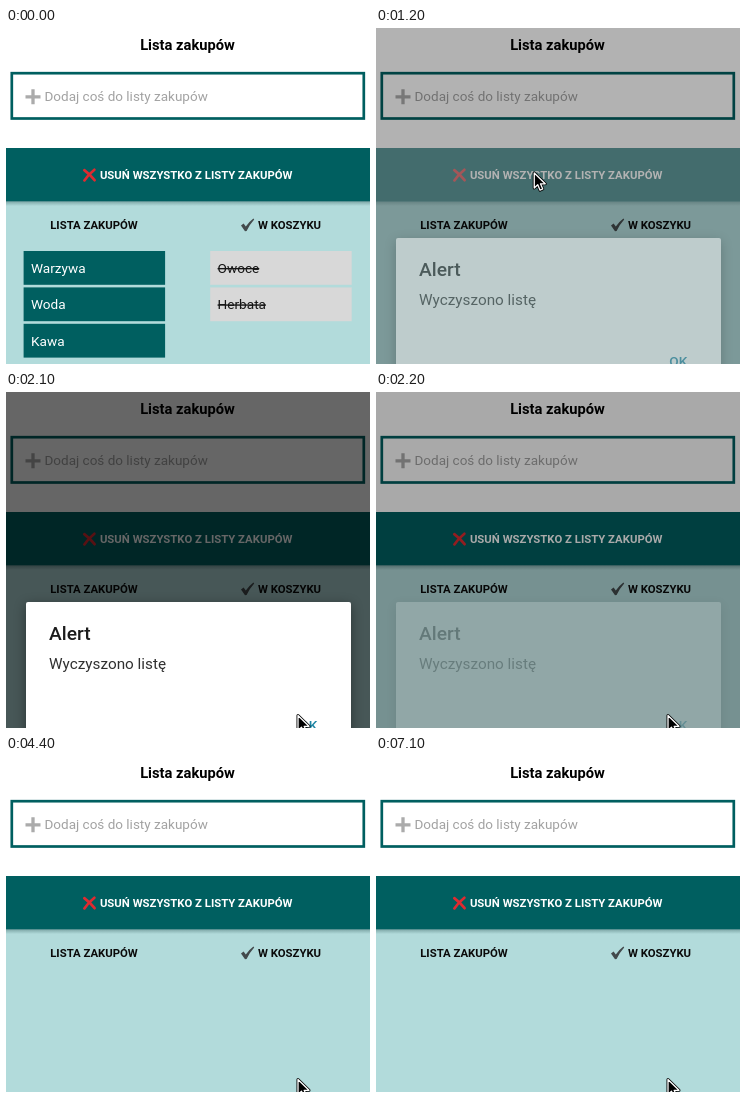
Recreate the animation shown at these times as an HTML page. Size 364x336 px, loop 7200 ms.

```html
<!DOCTYPE html>
<html lang="pl">
<head>
<meta charset="utf-8">
<title>Lista zakupów</title>
<style>
html, body { margin: 0; width: 100%; height: 100%; overflow: hidden; background: #fff; }
svg { display: block; width: 364px; height: 336px; }
text { font-family: Roboto, "Noto Sans", sans-serif; font-size: 13.6px; }
.title { font-size: 14.7px; font-weight: 700; text-anchor: middle; }
.hint { font-size: 13.5px; }
.caps { font-size: 11.35px; font-weight: 700; text-anchor: middle; }
.done { text-decoration: line-through; }
.head { font-size: 19.2px; font-weight: 500; }
.body { font-size: 15.3px; }
.ok { font-size: 13.6px; font-weight: 500; }
.card { filter: drop-shadow(0 3px 6px rgba(0, 0, 0, .4)); }
</style>
</head>
<body>
<svg viewBox="0 0 364 336" xmlns="http://www.w3.org/2000/svg">
  <defs>
    <linearGradient id="shade" x1="0" y1="0" x2="0" y2="1">
      <stop offset="0" stop-color="#2b5555" stop-opacity=".42"/>
      <stop offset="1" stop-color="#2b5555" stop-opacity="0"/>
    </linearGradient>
    <path id="arrow" d="M0 0V15L3.5 11.8L5.8 17.2L8.5 16L6.2 10.8H11Z" stroke-linejoin="round"/>
  </defs>
  <rect width="364" height="336" fill="#fff"/>
  <text class="title" x="181.5" y="22.4">Lista zakupów</text>

  <rect x="5.8" y="45.2" width="352" height="45.3" fill="#fff" stroke="#005f60" stroke-width="2.7"/>
  <path d="M19.5 68.8H34.5M27 61.3V76.3" stroke="#ababab" stroke-width="3.3"/>
  <text class="hint" x="38.5" y="73.2" fill="#a2a2a2">Dodaj coś do listy zakupów</text>

  <rect y="173" width="364" height="163" fill="#b2dbdb"/>
  <g id="button">
    <rect y="173" width="364" height="5" fill="url(#shade)"/>
    <rect y="120" width="364" height="53.3" fill="#005f60"/>
    <path d="M78.3 142.2Q84 146.5 88.6 152.2M88.4 141.8Q82.5 146.5 78.4 152.4" fill="none" stroke="#de2b30" stroke-width="2.7" stroke-linecap="round"/>
    <text class="caps" x="190.2" y="151" fill="#fff">USUŃ WSZYSTKO Z LISTY ZAKUPÓW</text>
  </g>

  <text class="caps" x="88" y="201" fill="#0a0a0a">LISTA ZAKUPÓW</text>
  <path d="M235 197.6L237.6 195.6L239.8 198.6Q243 193.6 247.4 190.4L248.2 191.4Q243.6 196.4 240.6 203L239 203.2Z" fill="#434a4c"/>
  <text class="caps" x="283.5" y="201" fill="#0a0a0a">W KOSZYKU</text>
  <g id="items"></g>

  <rect id="dim" width="364" height="336"/>
  <g id="dialog">
    <rect class="card" x="20" y="210" width="325" height="140" rx="2" fill="#fff"/>
    <text class="head" x="43" y="248" fill="#1c1c1c">Alert</text>
    <text class="body" x="43" y="277" fill="#303030">Wyczyszono listę</text>
    <text class="ok" x="293.3" y="338" fill="#1f86a4">OK</text>
  </g>
  <g id="cursor">
    <use href="#arrow" stroke="#000" stroke-width="3"/>
    <use href="#arrow" stroke="#fff" stroke-width="1.3"/>
  </g>
</svg>
<script>
const LOOP = 7200, STEP = 100;
const el = id => document.getElementById(id);
const set = (id, name, value) => el(id).setAttribute(name, value);

function addItems(names, x, fill, ink, cls) {
  el("items").innerHTML += names.map((name, i) => {
    const y = 223 + i * 36.4;
    return `<rect x="${x}" y="${y}" width="141.5" height="33.8" fill="${fill}"/>` +
      `<text class="${cls}" x="${x + 7.4}" y="${y + 22}" fill="${ink}">${name}</text>`;
  }).join("");
}
addItems(["Warzywa", "Woda", "Kawa"], 17.6, "#005f60", "#fff", "");
addItems(["Owoce", "Herbata"], 204.2, "#d8d8d8", "#151515", "done");

// Progress from 0 to 1 between two times.
const ramp = (t, from, to) => Math.min(1, Math.max(0, (t - from) / (to - from)));
const smooth = p => p * p * (3 - 2 * p);

function draw(time) {
  const t = Math.floor((time % LOOP) / STEP) * STEP;
  const opened = ramp(t, 1100, 1300);
  const press = ramp(t, 900, 1100) - opened;
  set("button", "opacity", 1 - .76 * press);
  set("items", "visibility", t < 1200 ? "visible" : "hidden");
  set("dim", "opacity", .6 * (opened - ramp(t, 2100, 2330)));
  set("dialog", "opacity", opened - ramp(t, 2100, 2225));

  // The pointer comes in from below, presses the button, then goes to OK.
  const enter = smooth(ramp(t, 100, 900));
  const drift = opened;
  const leave = smooth(ramp(t, 1500, 2000));
  const x = 300 - 143 * enter + 2.5 * drift + 132.5 * leave;
  const y = 336 - 191 * enter + 178.5 * leave;
  set("cursor", "visibility", t < 100 ? "hidden" : "visible");
  set("cursor", "transform", `translate(${x} ${y})`);
}

const start = performance.now();
function tick() {
  draw(performance.now() - start);
  requestAnimationFrame(tick);
}
tick();
</script>
</body>
</html>
```
